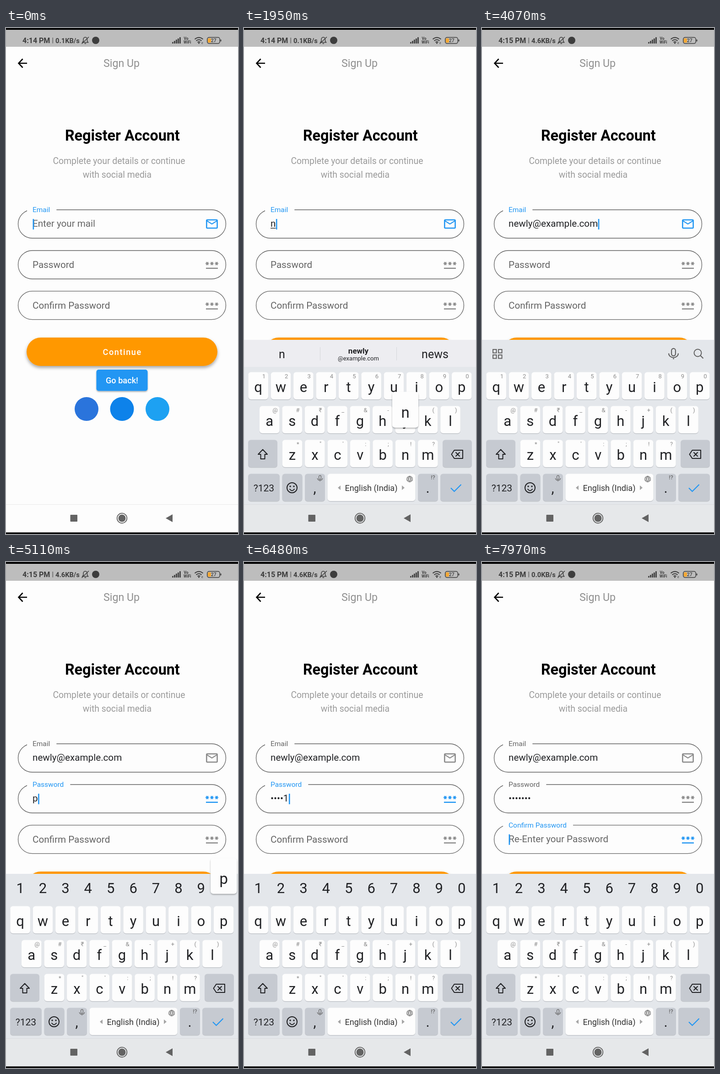
Write an HTML page that moves like this. It is 507 px wide and 1105 px high and loops after 8000 ms.

```html
<!DOCTYPE html>
<html lang="en">
<head>
<meta charset="utf-8">
<title>Sign Up</title>
<style>
  html, body { margin: 0; width: 100%; height: 100%; overflow: hidden; background: #fdfdfd; }
  svg { display: block; width: 100%; height: 100%; }
  text { font-family: Roboto, sans-serif; white-space: pre; }
</style>
</head>
<body>
<svg id="stage" viewBox="0 0 507 1105"></svg>
<script>
const LOOP = 8000;
const BLUE = '#2196f3', GREY = '#636363', INK = '#202124', PAPER = '#fdfdfd';
const stage = document.getElementById('stage');

function el(tag, attrs, parent = stage) {
  const node = document.createElementNS('http://www.w3.org/2000/svg', tag);
  set(node, attrs);
  parent.append(node);
  return node;
}
function set(node, attrs) {
  for (const k in attrs) node.setAttribute(k, attrs[k]);
}
function show(node, on) {
  node.style.display = on ? '' : 'none';
}
function group(parent, attrs = {}) {
  return el('g', attrs, parent);
}
function rect(x, y, width, height, fill, rx, parent) {
  return el('rect', { x, y, width, height, fill, rx: rx || 0 }, parent);
}
function circle(cx, cy, r, fill, parent) {
  return el('circle', { cx, cy, r, fill }, parent);
}
function line(d, stroke, width, parent, more) {
  return el('path', { d, stroke, fill: 'none', 'stroke-width': width, ...more }, parent);
}
function shape(d, fill, parent) {
  return el('path', { d, fill }, parent);
}
function label(str, x, y, size, fill, parent, more) {
  const node = el('text', { x, y, 'font-size': size, fill, ...more }, parent);
  node.textContent = str;
  return node;
}
function centred(str, x, y, size, fill, parent, more) {
  return label(str, x, y, size, fill, parent, { 'text-anchor': 'middle', ...more });
}
const ROUND = { 'stroke-linecap': 'round', 'stroke-linejoin': 'round' };

const defs = el('defs', {});
function shadow(id, dy, blur, opacity) {
  const f = el('filter', { id, x: '-20%', y: '-30%', width: '140%', height: '180%' }, defs);
  el('feDropShadow', { dx: 0, dy, stdDeviation: blur, 'flood-opacity': opacity }, f);
}
shadow('deep', 4, 3.5, 0.35);
shadow('low', 2, 1.5, 0.32);

// Page
rect(0, 0, 507, 1105, PAPER);
line('M46 77H28M36.5 67.5L27.5 77L36.5 86.5', '#000', 2.6);
label('Sign Up', 213, 85, 23.2, '#8f8f8f');
label('Register Account', 129, 245.5, 32.3, '#000', stage, { 'font-weight': 700 });
label('Complete your details or continue', 102.5, 297, 19.35, '#9a9a9a');
label('with social media', 167.8, 327, 19.35, '#9a9a9a');

function mailIcon(y) {
  const g = group(stage, { transform: `translate(434.5 ${y - 15.5}) scale(1.29)` });
  shape('M22 6c0-1.1-.9-2-2-2H4c-1.1 0-2 .9-2 2v12c0 1.1.9 2 2 2h16c1.1 0 2-.9 2-2V6zm-2 0l-8 5-8-5h16zm0 12H4V8l8 5 8-5v10z', 'currentColor', g);
  return g;
}
function starsIcon(y) {
  const g = group(stage, { transform: `translate(450 ${y})` });
  for (const x of [-10.3, 0, 10.3])
    line(`M${x - 3.9} -2.6h7.8M${x - 2} -6l4 6.8M${x + 2} -6l-4 6.8`, 'currentColor', 1.9, g);
  rect(-13, 6.5, 26, 2.5, 'currentColor', 0, g);
  return g;
}

function makeField(name, hint, y, icon, focusAt, blurAt) {
  rect(26.5, y, 454, 62, 'none', 31).setAttribute('stroke', GREY);
  stage.lastChild.setAttribute('stroke-width', 1.3);
  const gap = rect(46, y - 3, 0, 8, PAPER);
  const title = label(name, 58, 0, 15.48, GREY);
  return {
    y, gap, title, focusAt, blurAt,
    gapWidth: title.getComputedTextLength() + 26,
    hint: label(hint, 58, y + 37, 20.64, '#666'),
    value: label('', 58, y + 37, 20.64, INK),
    underline: rect(58, y + 39.5, 0, 1.4, INK),
    cursor: rect(58.5, y + 20, 2.6, 23, BLUE),
    icon: icon(y + 31)
  };
}
const fields = [
  makeField('Email', 'Enter your mail', 397, mailIcon, -1000, 4350),
  makeField('Password', 'Enter your Password', 486, starsIcon, 4350, 7500),
  makeField('Confirm Password', 'Re-Enter your Password', 574.7, starsIcon, 7500, LOOP)
];

rect(45, 676, 417, 62, '#ff9800', 31).setAttribute('filter', 'url(#deep)');
label('Continue', 211.5, 713.5, 18.06, '#fff', stage, { 'font-weight': 500, 'letter-spacing': 1.6 });
rect(197.5, 746, 112, 46.5, BLUE, 5).setAttribute('filter', 'url(#low)');
centred('Go back!', 253.5, 775.5, 18.1, '#fff', stage, { 'font-weight': 500 });
circle(176, 832, 26, '#2a74dc');
circle(253.5, 832, 26, '#0d82ea');
circle(331, 832, 26, '#1da1f2');

// Keyboard
const keyboard = group(stage);
rect(0, 681, 507, 360, '#e4e7eb', 0, keyboard);
const keyAt = {};

function keyBox(x, y, w, fill) {
  rect(x, y + 1.6, w, 59.5, '#c2c5ca', 6, keyboard);
  rect(x, y, w, 59.5, fill, 6, keyboard);
}
const toolbar = group(keyboard), digits = group(keyboard);
const suggestions = group(keyboard), digitHints = group(keyboard);

function keyRow(letters, hints, x0, y, hintGroup) {
  [...letters].forEach((ch, i) => {
    const x = x0 + i * 49.4;
    keyBox(x, y, 43.6, PAPER);
    centred(ch, x + 21.8, y + 43, 31, INK, keyboard);
    keyAt[ch] = [x + 21.8, y];
    centred(hints[i], x + 34, y + 13, 13, '#8c8c8c', hintGroup);
  });
}
keyRow('qwertyuiop', '1234567890', 9.3, 751.5, digitHints);
keyRow('asdfghjkl', '@#₹_&-+()', 34, 825.5, keyboard);
keyRow('zxcvbnm', '*"\':;!?', 83.7, 899.5, keyboard);
keyboard.append(digitHints);

const DARK_KEY = '#c6cad1';
keyBox(9, 899.5, 64, DARK_KEY);
keyBox(434, 899.5, 64, DARK_KEY);
for (const [x, w] of [[9, 69], [83.5, 44], [133, 44], [380, 44], [429, 69]]) keyBox(x, 973.5, w, DARK_KEY);
keyBox(182.5, 973.5, 192, PAPER);

line('M41 920.5L31 931H36.5V941H45.5V931H51Z', INK, 2, keyboard, ROUND);
line('M459.5 922H478V940H459.5L453.5 931ZM463 927L471 935M471 927L463 935', INK, 2, keyboard, ROUND);
centred('?123', 43.5, 1011.5, 21, INK, keyboard);
circle(105, 1004, 11, 'none', keyboard).setAttribute('stroke', INK);
keyboard.lastChild.setAttribute('stroke-width', 2);
circle(101, 1001, 1.7, INK, keyboard);
circle(109, 1001, 1.7, INK, keyboard);
line('M99.5 1006.5Q105 1014 110.5 1006.5', INK, 2, keyboard);
centred(',', 154.5, 1014.5, 31, INK, keyboard);
centred('.', 401.5, 1014.5, 31, INK, keyboard);
centred('!?', 413, 985.5, 13, '#555', keyboard);
centred('English (India)', 278, 1010.5, 18.1, '#333', keyboard);
shape('M211 999V1009L205 1004Z', '#a5a5a5', keyboard);
shape('M345 999V1009L351 1004Z', '#a5a5a5', keyboard);
line('M452 1004.5L459.5 1012L474.5 997', BLUE, 2.2, keyboard);

function mic(x, y, k, parent) {
  const g = group(parent, { transform: `translate(${x} ${y}) scale(${k})` });
  line('M0 -10.5A4 4 0 0 1 4 -6.5V0A4 4 0 0 1 -4 0V-6.5A4 4 0 0 1 0 -10.5M-9.5 -1A9.5 8.5 0 0 0 9.5 -1M0 7.5V11', GREY, 2, g);
}
mic(166, 983.5, 0.6, keyboard);
line('M355.7 985a6.3 6.3 0 1 0 12.6 0a6.3 6.3 0 1 0 -12.6 0M356 983H368M356 987H368M362 978.7Q356.5 985 362 991.3Q367.5 985 362 978.7', '#666', 1.1, keyboard);

for (const x of [24, 36])
  for (const y of [702, 714])
    line(`M${x} ${y}h7.5v7.5h-7.5z`, GREY, 2, toolbar);
mic(418.5, 711.5, 1.1, toolbar);
circle(471.5, 709.5, 8, 'none', toolbar).setAttribute('stroke', GREY);
toolbar.lastChild.setAttribute('stroke-width', 2);
line('M477.5 715.5L483.5 721.5', GREY, 2.2, toolbar);

[...'1234567890'].forEach((ch, i) => {
  const x = 31.1 + i * 49.4;
  centred(ch, x, 723, 31, INK, digits);
  keyAt[ch] = [x, 681];
});

rect(0, 681, 507, 59, '#ededf1', 0, suggestions);
line('M166.5 697V726M333.5 697V726', '#d5d7da', 1, suggestions);
const typedWord = centred('', 83, 720.5, 25, INK, suggestions);
centred('newly', 250, 711, 17, INK, suggestions, { 'font-weight': 700 });
centred('@example.com', 250, 726, 13, INK, suggestions);
centred('news', 417.5, 720.5, 25, INK, suggestions);

const popup = group(stage);
rect(-28.5, 0, 57, 78, PAPER, 6, popup).setAttribute('filter', 'url(#low)');
const popupChar = centred('', 0, 56, 33, INK, popup);

// Navigation bar
const navBack = rect(0, 1040, 507, 62, PAPER);
const navEdge = rect(0, 1040, 507, 1, '#e6e6e6');
rect(140.5, 1063, 15.5, 15, GREY, 1);
circle(253.5, 1070.5, 8, GREY);
circle(253.5, 1070.5, 10.8, 'none').setAttribute('stroke', GREY);
stage.lastChild.setAttribute('stroke-width', 1.8);
shape('M364 1062V1079L349 1070.5Z', GREY);
rect(0, 1101.5, 507, 4, '#000');

// Status bar
const DIM = '#3d3d3d', BOLD = { 'font-weight': 700 };
rect(0, 0, 507, 41, '#bdbdbd');
rect(0, 0, 507, 4, '#000');
const clock = label('', 36, 33, 16, DIM, stage, BOLD);
label('|', 100.5, 32, 14, DIM);
const speed = label('', 108, 32.5, 14.7, DIM, stage, BOLD);
line('M167 31.5H179.5L177.5 28.5V24.5A4.2 4.2 0 0 0 169 24.5V28.5ZM171.5 34H175M165.5 34.5L181 19.5', DIM, 1.5);
circle(196, 27, 8, DIM);
for (let i = 0; i < 5; i++) rect(363 + i * 4, 30.5 - i * 2.6, 2.8, 3.5 + i * 2.6, DIM, 1);
label('Vo', 388.5, 26, 8.5, DIM, stage, BOLD);
label('WiFi', 388, 34, 8.5, DIM, stage, BOLD);
line('M412.5 24.5Q421.5 17 430.5 24.5M415.5 28Q421.5 23 427.5 28M418.5 31.3Q421.5 28.8 424.5 31.3', DIM, 2);
circle(421.5, 33, 1.6, DIM);
label('e', 427, 35, 7, DIM);
rect(441, 22.5, 7, 9.5, '#f5a833', 2);
rect(439.8, 20.5, 27.5, 13.3, 'none', 4).setAttribute('stroke', DIM);
stage.lastChild.setAttribute('stroke-width', 1.5);
rect(468.5, 25, 2, 4.5, DIM, 1);
centred('27', 453.8, 31, 10.5, DIM, stage, { 'font-weight': 500 });

// Timeline
const EMAIL = 'newly@example.com', FILL_AT = 3000;
const KEYBOARD_AT = 1400, TAP_MS = 120;
const taps = [
  [1900, 'n'], [2150, 'e'], [2400, 'w'],
  [5050, 'p'], [5350, 'a'], [5620, 's'], [5950, 's'],
  [6320, '1'], [6650, '2'], [6900, '3']
];
const cursorResets = [0, FILL_AT, 4350, 7500, ...taps.map(tap => tap[0])];

const ease = (t, start, ms) => {
  const p = Math.min(1, Math.max(0, (t - start) / ms));
  return 1 - (1 - p) ** 3;
};
const mix = (a, b, p) => a + (b - a) * p;
const typed = (t, from, to) => taps.filter(([at]) => at <= t && at >= from && at < to).map(tap => tap[1]).join('');

function drawField(field, t, text, composing) {
  const focused = t >= field.focusAt && t < field.blurAt;
  const p = ease(t, field.focusAt, 200);
  set(field.gap, { width: field.gapWidth * p });
  set(field.title, {
    y: field.y + mix(37.8, 5.3, p),
    'font-size': mix(20.64, 15.48, p),
    fill: focused ? BLUE : GREY
  });
  set(field.hint, { opacity: text ? 0 : p });
  field.value.textContent = text;
  const width = text ? field.value.getComputedTextLength() : 0;
  set(field.underline, { width: composing ? width : 0 });
  const lastReset = Math.max(...cursorResets.filter(at => at <= t));
  set(field.cursor, { x: 58.5 + width });
  show(field.cursor, focused && Math.floor((t - lastReset) / 500) % 2 === 0);
  field.icon.setAttribute('color', focused ? BLUE : '#8a8a8a');
}

function draw(t) {
  clock.textContent = t < 2900 ? '4:14 PM' : '4:15 PM';
  speed.textContent = t < 2900 ? '0.1KB/s' : t < 6900 ? '4.6KB/s' : '0.0KB/s';

  const word = typed(t, 0, FILL_AT);
  const secret = typed(t, 4350, 7500);
  const dots = t >= 7500 ? secret.length : Math.max(0, secret.length - 1);
  drawField(fields[0], t, t < FILL_AT ? word : EMAIL, t < FILL_AT);
  drawField(fields[1], t, '•'.repeat(dots) + secret.slice(dots), false);
  drawField(fields[2], t, '', false);

  const open = ease(t, KEYBOARD_AT, 260);
  show(keyboard, open > 0);
  set(keyboard, { transform: `translate(0 ${360 * (1 - open)})` });
  set(navBack, { fill: open > 0 ? '#e6e8ea' : PAPER });
  set(navEdge, { fill: open > 0 ? '#d9dbde' : '#e9e9e9' });

  const numeric = t >= 4400, suggesting = word !== '' && t < FILL_AT;
  typedWord.textContent = word;
  show(digits, numeric);
  show(digitHints, !numeric);
  show(suggestions, suggesting);
  show(toolbar, !numeric && !suggesting);

  const tap = taps.find(([at]) => t >= at && t < at + TAP_MS);
  show(popup, tap);
  if (tap) {
    const [x, y] = keyAt[tap[1]];
    set(popup, { transform: `translate(${x} ${y - 105})` });
    popupChar.textContent = tap[1];
  }
}

const start = performance.now();
function tick() {
  draw((performance.now() - start) % LOOP);
  requestAnimationFrame(tick);
}
tick();
</script>
</body>
</html>
```
